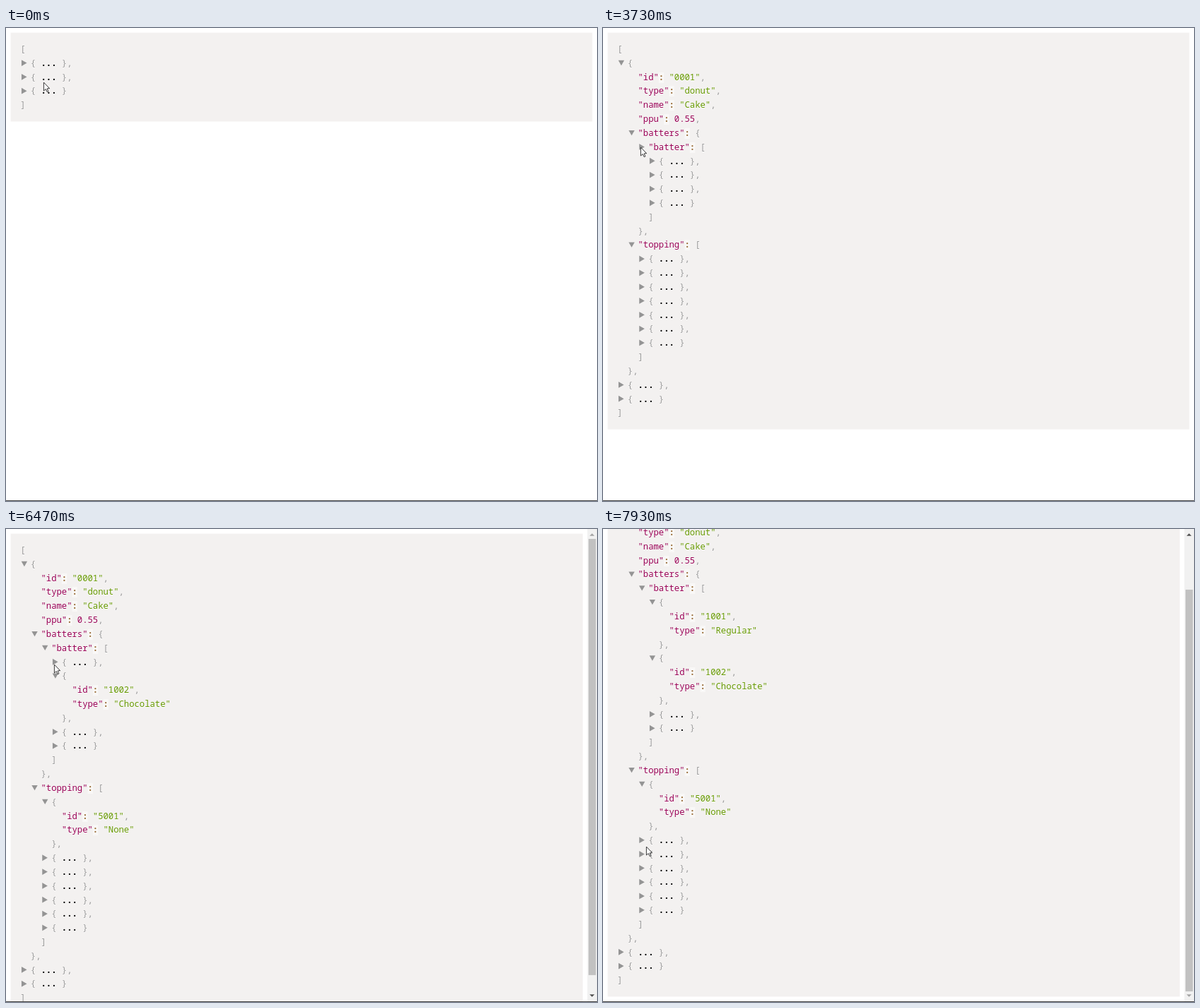
An HTML page with a canvas for the animation above (8 s loop, 836 by 670 pixels).

```html
<!DOCTYPE html>
<html lang="en">
<head>
<meta charset="utf-8">
<title>Collapsible JSON</title>
<style>
  html, body { margin: 0; width: 100%; height: 100%; overflow: hidden; background: #fff; }
  canvas { display: block; }
</style>
</head>
<body>
<canvas id="stage" width="836" height="670"></canvas>
<script>
const ctx = document.getElementById('stage').getContext('2d');
const LOOP = 8000, STEP = 1000 / 15;
const VIEW_W = 836, VIEW_H = 669, BAR_W = 13.6;
const MARGIN = 6.6, PAD = 13.4, LEFT = 20.2, TOP = 20.2;
const LINE = 19.82, INDENT = 14.66;
const FONT = '12.22px "Noto Sans Mono", monospace';
const COLORS = {
  key: '#990055', string: '#669900', number: '#990055',
  operator: '#9a6e3a', punctuation: '#999', plain: '#000'
};

// Each branch carries the time at which it is opened.
const leaf = (key, value) => ({ key, value });
const branch = (key, brackets, open = Infinity, kids = []) => ({ key, brackets, open, kids });
const closed = n => Array.from({ length: n }, () => branch('', '{}'));
const item = (id, type, open) => branch('', '{}', open, [leaf('id', `"${id}"`), leaf('type', `"${type}"`)]);

const tree = branch('', '[]', -1000, [
  branch('', '{}', 870, [
    leaf('id', '"0001"'),
    leaf('type', '"donut"'),
    leaf('name', '"Cake"'),
    leaf('ppu', '0.55'),
    branch('batters', '{}', 1930, [
      branch('batter', '[]', 3730, [
        item('1001', 'Regular', 6670),
        item('1002', 'Chocolate', 5800),
        ...closed(2)
      ])
    ]),
    branch('topping', '[]', 3000, [item('5001', 'None', 4870), ...closed(6)])
  ]),
  ...closed(2)
]);

// Pointer path: time, x, y
const path = [
  [0, 53, 77], [70, 53, 77], [730, 31, 45], [870, 31, 45], [1130, 31, 50],
  [1330, 31, 50], [1800, 40, 147], [1930, 40, 147], [2130, 41, 160],
  [2267, 43, 184], [2670, 43, 203], [3070, 43, 203], [3670, 53, 169],
  [3870, 53, 169], [4470, 55, 327], [4670, 55, 327], [4867, 56.5, 332],
  [4930, 56.5, 332], [5470, 65, 221], [5600, 67, 214], [5930, 67, 212],
  [6467, 68, 192], [6730, 68, 192], [7333, 58, 332], [7930, 61, 450], [LOOP, 61, 450]
];

function layout(node, t, depth = 0, comma = '', rows = []) {
  const label = node.key ? `"${node.key}": ` : '';
  if (!node.brackets) {
    rows.push({ depth, text: label + node.value + comma });
    return rows;
  }
  const [start, end] = node.brackets;
  const toggle = depth > 0;
  if (t < node.open) {
    rows.push({ depth, toggle, text: `${label}${start} ... ${end}${comma}` });
    return rows;
  }
  // The marker turns one step after the content appears.
  rows.push({ depth, toggle, down: t >= node.open + 60, text: label + start });
  node.kids.forEach((kid, i) =>
    layout(kid, t, depth + 1, i < node.kids.length - 1 ? ',' : '', rows));
  rows.push({ depth, text: end + comma });
  return rows;
}

function pointerAt(t) {
  const i = Math.max(1, path.findIndex(p => p[0] > t));
  const [t0, x0, y0] = path[i - 1], [t1, x1, y1] = path[i];
  const u = (t - t0) / (t1 - t0), e = u * u * (3 - 2 * u);
  return { x: x0 + (x1 - x0) * e, y: y0 + (y1 - y0) * e };
}

function scrollAt(t, max) {
  const u = Math.min(1, Math.max(0, (t - 7133) / 418));
  return max * (1 - (1 - u) ** 3);
}

function polygon(points, fill, stroke) {
  ctx.beginPath();
  points.forEach(([x, y]) => ctx.lineTo(x, y));
  ctx.closePath();
  ctx.fillStyle = fill;
  ctx.fill();
  if (stroke) {
    ctx.strokeStyle = stroke;
    ctx.lineWidth = 0.9;
    ctx.stroke();
  }
}

function rect(x, y, w, h, fill) {
  ctx.fillStyle = fill;
  ctx.fillRect(x, y, w, h);
}

function tokenKind(token, rest) {
  if (token[0] === '"') return rest.startsWith(':') ? 'key' : 'string';
  if (token === ':') return 'operator';
  if (/\d/.test(token)) return 'number';
  return token === '...' ? 'plain' : 'punctuation';
}

function drawText(text, x, y) {
  ctx.font = FONT;
  const cell = ctx.measureText('0').width;
  for (const match of text.matchAll(/"[^"]*"|\.\.\.|[\d.]+|[^\s]/g)) {
    const token = match[0], left = x + match.index * cell;
    const kind = tokenKind(token, text.slice(match.index + token.length));
    if (kind === 'operator') rect(left, y - 11, cell, 15, 'rgba(255,255,255,.5)');
    // Dots are too faint at the regular weight.
    ctx.font = kind === 'operator' || kind === 'plain' ? 'bold ' + FONT : FONT;
    ctx.fillStyle = '#fff';
    ctx.fillText(token, left, y + 1);
    ctx.fillStyle = COLORS[kind];
    ctx.fillText(token, left, y);
  }
}

function drawToggle(x, y, down) {
  const points = down
    ? [[x - 0.3, y - 3.7], [x + 8.1, y - 3.7], [x + 3.9, y + 3.6]]
    : [[x, y - 4.4], [x + 7.6, y], [x, y + 4.4]];
  polygon(points, '#949494');
}

function drawRow(row, top) {
  const x = LEFT + row.depth * INDENT;
  if (row.toggle) drawToggle(x - 12.9, top + LINE / 2 - 0.4, row.down);
  drawText(row.text, x, Math.round(top + 13.8));
}

function drawScrollbar(scroll, docH) {
  const x = VIEW_W - BAR_W, mid = 829, track = VIEW_H - 28;
  const ratio = track / docH, max = docH - VIEW_H;
  const arrow = (y, dir, live) =>
    polygon([[mid - 3.5, y - 1.8 * dir], [mid + 3.5, y - 1.8 * dir], [mid, y + 1.8 * dir]], live ? '#505050' : '#a3a3a3');
  rect(x, 0, BAR_W, VIEW_H, '#f1f1f1');
  rect(x + 1.6, 14 + scroll * ratio, 10.4, VIEW_H * ratio, '#c1c1c1');
  arrow(8, -1, scroll > 0.5);
  arrow(661, 1, scroll < max - 0.5);
}

function drawArrow(x, y) {
  const shape = [[0, 0], [0, 12], [2.8, 9.5], [4.8, 13.6], [6.5, 12.9], [4.7, 8.9], [8.2, 8.6]];
  polygon(shape.map(([dx, dy]) => [x + 0.4 + dx, y + dy]), '#fff', '#222');
}

function drawBeam(x, y) {
  x = Math.round(x) - 0.5;
  y = Math.round(y);
  ctx.strokeStyle = '#333';
  ctx.lineWidth = 1;
  ctx.beginPath();
  ctx.moveTo(x, y - 6);
  ctx.lineTo(x, y + 6);
  for (const edge of [y - 6.5, y + 6.5]) {
    ctx.moveTo(x - 3, edge);
    ctx.lineTo(x + 3, edge);
  }
  ctx.stroke();
}

function draw(t) {
  const rows = layout(tree, t + 5);
  const boxH = rows.length * LINE + 2 * PAD;
  const docH = boxH + 2 * MARGIN;
  const hasBar = docH > VIEW_H;
  const scroll = hasBar ? scrollAt(t, docH - VIEW_H) : 0;
  const pageW = VIEW_W - (hasBar ? BAR_W : 0);

  rect(0, 0, VIEW_W, 670, '#fff');
  rect(MARGIN, MARGIN - scroll, pageW - 2 * MARGIN, boxH, '#f3f1f0');
  rows.forEach((row, i) => drawRow(row, TOP + i * LINE - scroll));
  if (hasBar) drawScrollbar(scroll, docH);

  const { x, y } = pointerAt(t);
  const hovered = rows[Math.floor((y + scroll - TOP) / LINE)];
  if (hovered && hovered.toggle) drawArrow(x, y);
  else drawBeam(x, y);
  rect(0, VIEW_H, VIEW_W, 1, '#444');
}

// The picture advances 15 times a second; the margin absorbs clock rounding.
const began = performance.now();
function tick() {
  const t = Math.max(0, performance.now() - began) % LOOP;
  draw(Math.floor((t + 10) / STEP) * STEP % LOOP);
  requestAnimationFrame(tick);
}
tick();
</script>
</body>
</html>
```
